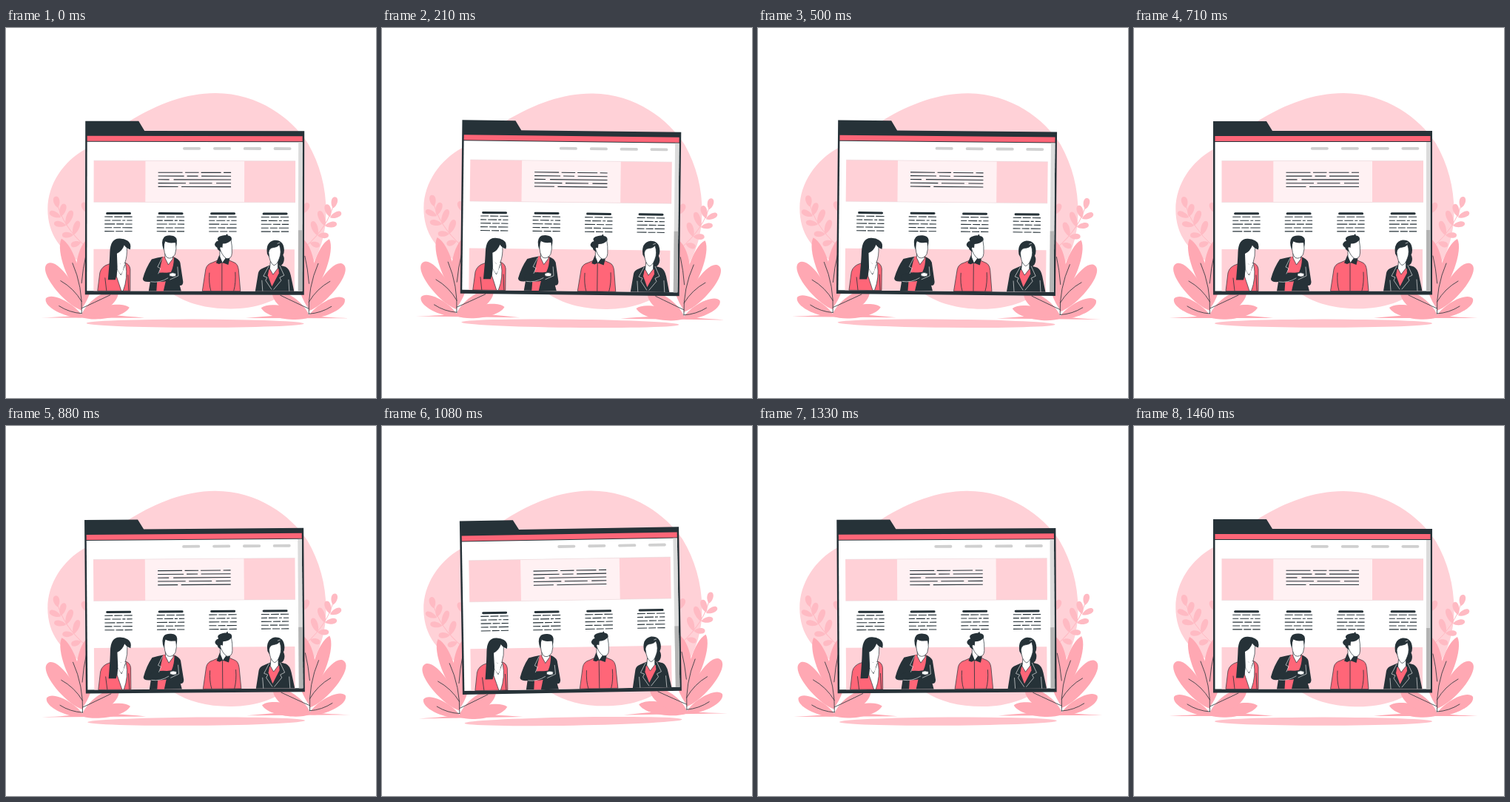
Animation, 500 px wide and 500 px high, one loop 1500 ms. Source, as an HTML page:

```html
<!DOCTYPE html>
<html lang="en">
<head>
<meta charset="utf-8">
<title>Team page</title>
<style>
html, body { margin: 0; width: 100%; height: 100%; overflow: hidden; background: #fff; }
svg { display: block; width: 100vw; height: 100vh; }
.ink { fill: #263238; }
.pink { fill: #ff6678; }
.pale { fill: #ffd1d7; }
.white { fill: #fff; }
.edge { stroke: #263238; stroke-width: .7; stroke-linejoin: round; }
.line { fill: none; stroke: #263238; stroke-width: .8; stroke-linecap: round; }
.thin { fill: none; stroke: #fff; stroke-width: .6; stroke-linecap: round; }
.text { fill: none; stroke: #263238; stroke-width: 1.1; }
</style>
</head>
<body>
<svg viewBox="0 0 500 500">
  <defs>
    <g id="plant">
      <g id="sprig" fill="#ffbac3"></g>
      <g id="leaves" fill="#ffa8b3"></g>
      <path fill="#ffa8b3" d="M47.5 391.9Q85 390.4 102 388T188 391.9Z"/>
      <path class="line" d="M102.5 386Q104 350 90 318 M102.3 345Q104 325 108 308
        M102.5 370Q92 352 74 342 M102.5 386Q86 385 72 376 M102.5 379Q118 372 141 361"/>
    </g>
  </defs>

  <g id="scene">
    <path class="pale" d="M56.3 245C56.3 211 78 180 107 164C130 151 146 139 170 124
      C205 103 243 88 283 88C341 88 386 122 408 156C424 184 432.5 215 432.5 248
      C432.5 290 417 325 388 350C366 370 336 379.3 304 379.3C270 379.3 245 372 225 359
      C190 340 145 338 107 320C75 304 56.3 280 56.3 245Z"/>
    <ellipse cx="256" cy="399.2" rx="147" ry="5.6" fill="#ffc2ca"/>
    <use href="#plant"/>
    <use href="#plant" transform="matrix(-1 0 0 1 512 0)"/>

    <!-- window -->
    <path class="ink" d="M107 126H179L187 139H403V360.5H107Z"/>
    <path class="white" d="M109.5 154H400.5V355.5H109.5Z"/>
    <path class="pink" d="M109.5 146H400.5V153H109.5Z"/>
    <path fill="#dbdbdb" d="M395 154H400.5V355.5H395Z"/>
    <path fill="#b4b4b4" d="M395 273H400.5V355.5H395Z"/>
    <path stroke="#d0d0d0" stroke-width="3.8" stroke-linecap="round"
      d="M240.7 162.8H261 M281.7 162.8H302 M322.5 162.8H343 M363.3 162.8H383.5"/>
    <path class="pale" d="M118.5 179.5H391V235.5H118.5Z M118.5 299H390V355.5H118.5Z"/>
    <path fill="#fff1f3" d="M188.3 179.5H322V235.5H188.3Z"/>
    <path stroke="#e4d3d6" stroke-width=".5" d="M118.5 179.5H391 M118.5 235.5H391"/>
    <g id="copy"></g>

    <!-- long-haired woman -->
    <path class="pink edge" d="M124 355.5L127 331Q129 322 140 319L161 317.5Q167 319 168 326L168 355.5Z"/>
    <path class="white edge" d="M149 316L149.5 336Q153 346 156 355.5H158.5Q165 338 162 320L159 313Z"/>
    <path class="line" d="M134 338L136 355 M165 334L166 355 M150 325L155.5 334L161 320"/>
    <path class="white edge" d="M149 300L160 293L163.5 297Q164 309 161 317Q158 321.5 154 319L149 314Z"/>
    <path class="white" d="M149.5 313L155 319.5L160 317.5L158 329L155.5 333Q151 329 149.5 322Z"/>
    <path class="ink" d="M154 284.8C145 284.3 141 291 140.5 303C140 318 139 328 138 340.5H148
      Q151.5 329 150.5 318L150 305Q157 302 160 293.5Q162 297.5 168 299.5Q170 291 164 287.5Q160 284.8 154 284.8Z"/>

    <!-- man with folded arms -->
    <path class="ink" d="M197 312.5Q204 310.5 213 309H226Q234 312 235.5 317L239.5 343Q239.5 348.5 235 348L237 355.5H193
      L195 343Q185 344 185 339Q189 324 197 312.5Z"/>
    <path class="pink" d="M212 309L227 310Q227 322 223 330L207 332Q209 320 212 309Z
      M204.5 341L216 342L213 355.5H203.5Z"/>
    <path class="white edge" d="M215 304V311L219.5 320L225.5 312V303Z"/>
    <path class="white edge" d="M213.5 292Q213 306 218 310.5Q224 313 228.5 306Q231 299 229.5 290L215 288Z"/>
    <path class="ink" d="M213 300Q209 288 213.5 283Q216 280 223 280.5Q230.5 281 231 287Q231 292 230 296L229 290
      Q219 291.5 215 288Q214 292 213 300Z"/>
    <path class="ink" d="M194 335Q208 328 221 332L222 341Q206 345 194 342Z"/>
    <path class="white edge" d="M221 332Q225 329.5 230 332L229.5 335.5Q225 337 221 335Z"/>
    <path class="thin" d="M196 343Q208 345 219 338 M232 323L233 335L222 340 M211 311L205 323L209 325L206 332"/>

    <!-- man in shirt -->
    <path class="pink edge" d="M265.5 355.5L270 326Q271.5 319 279 317L286 314H302L309 317Q313.5 319 314.5 327L317 355.5Z"/>
    <path class="line" d="M292 318V355 M275 331Q274 345 277 355 M310 330Q311 344 308 355"/>
    <path class="white edge" d="M289 299V309L292.5 318L298 310.5V302Z"/>
    <path class="ink" d="M288.5 306.5L284 317.5L288 319L292.5 317L289.5 310Z M298.5 308.5L292.5 317L300.5 320L302.5 311.5Z"/>
    <path class="white edge" d="M288 294Q291 307 298 311.5Q305 312.5 305.5 304Q306 295 304 285L293 287Z"/>
    <path class="ink" d="M305 286Q301 291.5 293 291.5L292.5 297Q289.5 295 289 298L290.5 302
      Q285.5 300 285.5 297Q281 294 282.5 291Q284 288 287 287.5Q284 284 289 281.5Q294 279.5 297 280L299 278
      L300 280.5Q305.5 281 305 286Z"/>

    <!-- woman in blazer -->
    <path class="ink" d="M337 355.5L341 331Q342 326 348 324L356 320.5H371L378 322.5Q383 325 385 334L389.5 355.5Z"/>
    <path class="pink" d="M355.5 326L354 334L359.5 349L369 331L368.5 325Z"/>
    <path class="ink" d="M353 305Q350.5 289 363 286.5Q375.5 286 376 300Q376 304 374.5 306.5Q377.5 312 374.5 318
      Q370.5 324 366 319L356 310Z"/>
    <path class="white edge" d="M357.5 315L356.5 325L361 333L367.5 324.5V313Z"/>
    <path class="white edge" d="M355 303Q356 297 361 296.5Q367 296 369.5 292.5Q373 303 369.5 311Q366.5 320 362 320.5Q356 317 355 303Z"/>
    <path class="thin" d="M355 322L348 335L353 337L351 341L359 353 M370 321L376 334L370 337L372 341L362 353
      M346 341L347 355 M382 340L383 355 M367 291L370 290"/>
  </g>
</svg>
<script>
const $ = id => document.getElementById(id);
const path = d => `<path d="${d}"/>`;

// Leaf from its base (x, y) to its tip; a higher `round` blunts the tip.
function leaf(x, y, tx, ty, w, round = .85) {
  const dx = tx - x, dy = ty - y, n = Math.hypot(dx, dy);
  const nx = -dy / n * w, ny = dx / n * w;
  const at = (k, s) => `${x + dx * k + nx * s} ${y + dy * k + ny * s}`;
  return path(`M${x} ${y}C${at(.25, .85)} ${at(round, 1)} ${tx} ${ty}C${at(round, -1)} ${at(.25, -.85)} ${x} ${y}Z`);
}

$('leaves').innerHTML =
  leaf(102, 364, 75, 285, 13) + leaf(103, 382, 56, 319, 17, 1) +
  leaf(104, 391, 54, 366, 13, .95) + leaf(102, 391, 167, 378, 12) +
  leaf(101, 391, 152, 357, 15) + leaf(102, 380, 112, 284, 19);

$('sprig').innerHTML =
  '<path d="M69 236Q76 268 108 296" fill="none" stroke="#ffbac3"/>' +
  leaf(70, 243, 67, 228, 6, 1) + leaf(74, 255, 79, 238, 6, 1) +
  leaf(74, 256, 59, 249, 5.5, 1) + leaf(81, 267, 89, 247, 6, 1) +
  leaf(81, 267, 65, 264, 5.5, 1) + leaf(91, 280, 98, 261, 6, 1) +
  leaf(91, 280, 76, 280, 5.5, 1) + leaf(101, 290, 88, 294, 5.5, 1) +
  leaf(110, 250, 104, 236, 6, 1);

// A paragraph: full-width rules broken by gaps given as [start, end].
function paragraph(x, y, w, step, rows) {
  let d = '';
  rows.forEach((gaps, i) => {
    d += `M${x} ${y + i * step}`;
    gaps.forEach(([a, b]) => d += `H${x + a}m${b - a} 0`);
    d += `H${x + w}`;
  });
  return `<path class="text" d="${d}"/>`;
}

const column = [
  [[11, 13], [24, 26]], [[8, 10], [22, 24], [28, 30]], [[14, 16], [26, 28]],
  [[10, 12], [22, 24]], [[13, 15], [25, 27]]
];
let copy = paragraph(205.5, 195.3, 98.5, 4.8, [
  [[33, 36.5], [55, 58], [85, 88.5]], [[35, 39], [54, 58.5]], [[15, 21]],
  [[37.5, 42], [73, 78.5]], [[27, 31.5]]
]);
for (let i = 0; i < 4; i++) {
  const x = 133.3 + i * 70.5;
  copy += `<rect class="ink" x="${x + 1.8}" y="249.2" width="34" height="3" rx="1.5"/>`;
  copy += paragraph(x, 255.3, 37.3, 4.9, column);
}
$('copy').innerHTML = copy;

// Sway: 0 -> 1 -> -1 -> 0 degrees, linear, at 24 pictures a second.
const LOOP = 1500, STEPS = 36;
function sway(p) {
  if (p < .25) return p * 4;
  if (p < .75) return 2 - p * 4;
  return p * 4 - 4;
}
function draw(ms) {
  const step = Math.floor((ms % LOOP + 5) * STEPS / LOOP);
  const p = (step + 1) % STEPS / STEPS;
  $('scene').setAttribute('transform', `rotate(${sway(p).toFixed(4)} 250 250)`);
}

const start = performance.now();
function tick() {
  draw(performance.now() - start);
  requestAnimationFrame(tick);
}
tick();
</script>
</body>
</html>
```
